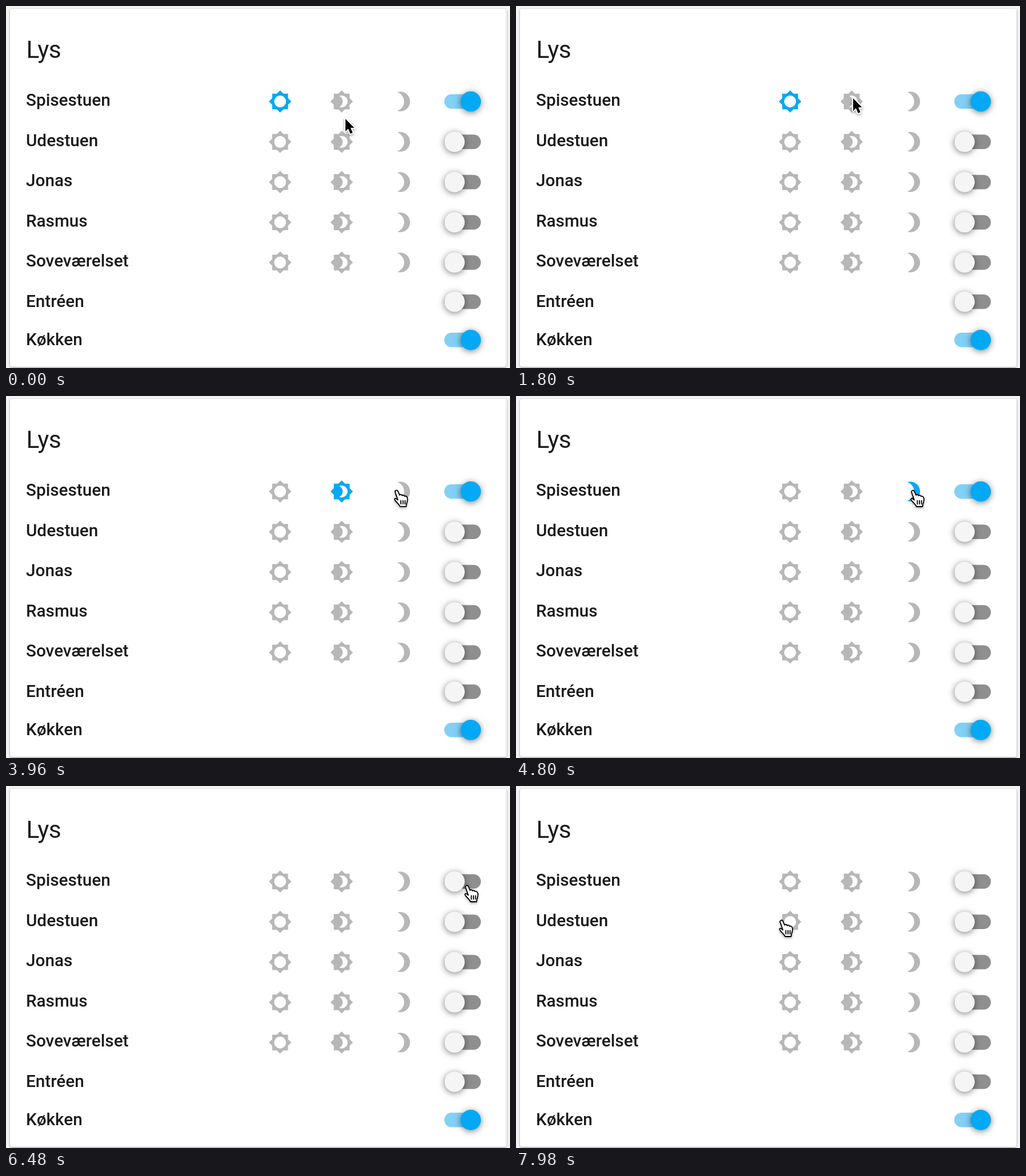
An HTML page for the animation above (8000 ms loop, 882 px wide and 635 px high).

```html
<!DOCTYPE html>
<html lang="da">
<head>
<meta charset="utf-8">
<title>Lys</title>
<style>
  html, body { margin: 0; width: 100%; height: 100%; overflow: hidden; background: #f3f3f3; }
  svg { display: block; width: 882px; height: 635px; }
  text { font-family: Roboto, sans-serif; fill: #1b1b1b; }
  .title { font-size: 42.5px; letter-spacing: -.5px; }
  .label { font-size: 29.7px; font-weight: 500; }
  .card { fill: #fff; filter: drop-shadow(0 1px 1.5px rgba(0,0,0,.4)); }
  .knob { filter: drop-shadow(0 2px 6px rgba(0,0,0,.5)); }
  #cursor { filter: drop-shadow(0 2px 2px rgba(0,0,0,.35)); }
</style>
</head>
<body>
<svg id="stage" viewBox="0 0 882 635">
  <rect class="card" x="7" y="5" width="869" height="628" rx="3.5"/>
  <text class="title" x="35.5" y="90.5">Lys</text>
  <g id="rows"></g>
  <circle id="ripple" cy="167.5" fill="#03a9f4"/>
  <g id="cursor">
    <path id="arrow" stroke="#fff" stroke-width="4" paint-order="stroke" stroke-linejoin="round"
      d="M1 2V24L6 19.3 9.6 28 13.6 26.3 10 17.8H16.5Z"/>
    <g id="hand" fill="#fff" stroke="#000" stroke-width="1.8" stroke-linejoin="round" stroke-linecap="round">
      <path d="M-2.7 3C-3.5 0 .3-2 2 1L5 8C5.5 6.5 9 6.5 9.6 9 10.5 7.5 13 8 13.7 10 15 9 18 10 18.6 13 19.5 17 18.5 20 17 24L16.5 28H6C4 24 0 21-3 17-5 14-2.5 12.5 0 15L2 16.5Z"/>
      <path d="M7.3 17.5V23.5M11 17.5V23.5M14.6 17.5V23.5"/>
    </g>
  </g>
</svg>
<script>
const LOOP = 8000, STEP = 60;
const BLUE = [3, 169, 244], GREY = [183, 183, 183];
const TRACK_ON = [131, 208, 246], TRACK_OFF = [143, 143, 143], KNOB_OFF = [245, 245, 245];

const SUN = 'M20 15.31L23.31 12 20 8.69V4H15.31L12 .69 8.69 4H4V8.69L.69 12 4 15.31V20H8.69L12 23.31 15.31 20H20Z';
const ICONS = [
  { x: 479.7, d: SUN + 'M12 18A6 6 0 0 1 12 6 6 6 0 0 1 12 18Z' },
  { x: 587.5, d: SUN + 'M12 18C11.11 18 10.26 17.8 9.5 17.45 11.56 16.5 13 14.42 13 12 13 9.58 11.56 7.5 9.5 6.55 10.26 6.2 11.11 6 12 6A6 6 0 0 1 12 18Z' },
  { x: 695, d: 'M9 2C7.95 2 6.95 2.16 6 2.46 10.06 3.73 13 7.5 13 12 13 16.5 10.06 20.27 6 21.54 6.95 21.84 7.95 22 9 22A10 10 0 0 0 9 2Z' }
];
const ROOMS = [
  ['Spisestuen', 167.5, true], ['Udestuen', 238.3, true], ['Jonas', 308.9, true],
  ['Rasmus', 379.5, true], ['Soveværelset', 450, true], ['Entréen', 518.7], ['Køkken', 585.8]
];
const LABEL_Y = [175, 245.6, 316.2, 386.8, 457.2, 528, 594.7];

// Pointer stops: time, x, y
const PATH = [
  [0, 593, 196], [1300, 593, 196], [1800, 589, 160], [2100, 587, 165], [3400, 587, 165],
  [4100, 695, 166], [4850, 695, 166], [5500, 809, 178], [5900, 809, 178],
  [6300, 807, 175], [6800, 807, 175], [7750, 465, 236], [LOOP, 465, 236]
];
const DIM_AT = 2520, NIGHT_AT = 4560, TOGGLE_AT = 5760, OFF_AT = 6000;

const $ = id => document.getElementById(id);
const clamp = v => Math.max(0, Math.min(1, v));
const mix = (a, b, k) => a + (b - a) * k;
const rgb = (a, b, k) => `rgb(${a.map((v, i) => Math.round(mix(v, b[i], k)))})`;

function add(tag, attrs, parent) {
  const el = document.createElementNS('http://www.w3.org/2000/svg', tag);
  for (const key in attrs) el.setAttribute(key, attrs[key]);
  return parent.appendChild(el);
}

const rows = ROOMS.map(([name, y, dimmable], i) => {
  const parent = $('rows');
  add('text', { class: 'label', x: 35, y: LABEL_Y[i] }, parent).textContent = name;
  const icons = dimmable ? ICONS.map(icon => add('path', {
    d: icon.d, 'fill-rule': 'evenodd', fill: rgb(GREY, GREY, 0),
    transform: `translate(${icon.x} ${y}) scale(1.73) translate(-12 -12)`
  }, parent)) : [];
  const track = add('rect', { x: 767, y: y - 12.7, width: 64, height: 25.4, rx: 12.7 }, parent);
  const knob = add('circle', { class: 'knob', cy: y, r: 17.8 }, parent);
  return { icons, track, knob };
});

function setToggle({ track, knob }, on) {
  track.setAttribute('fill', rgb(TRACK_OFF, TRACK_ON, on));
  knob.setAttribute('fill', rgb(KNOB_OFF, BLUE, on));
  knob.setAttribute('cx', mix(785, 813.3, on));
}
rows.forEach((row, i) => setToggle(row, i === 6 ? 1 : 0));

function pointerAt(t) {
  const i = PATH.findIndex(stop => stop[0] > t);
  const [t0, x0, y0] = PATH[i - 1], [t1, x1, y1] = PATH[i];
  const k = (t - t0) / (t1 - t0), ease = k * k * (3 - 2 * k);
  return [mix(x0, x1, ease), mix(y0, y1, ease)];
}

function isClickable(x, y) {
  const onIcon = ICONS.some(icon => Math.abs(x - icon.x) < 30);
  const onToggle = x > 767 && x < 831;
  return (onIcon || onToggle) && ROOMS.some(room => Math.abs(y - room[1]) < 26);
}

function draw(t) {
  const active = t < DIM_AT ? 0 : t < NIGHT_AT ? 1 : t < OFF_AT ? 2 : -1;
  rows[0].icons.forEach((icon, i) => icon.setAttribute('fill', rgb(GREY, BLUE, i === active ? 1 : 0)));

  const on = 1 - clamp((t - TOGGLE_AT) / 90);
  setToggle(rows[0], on);

  const age = t - TOGGLE_AT + STEP;
  $('ripple').setAttribute('cx', mix(785, 813.3, on));
  $('ripple').setAttribute('r', 50 * clamp(age / 180));
  $('ripple').setAttribute('opacity', age > 0 ? .2 * clamp((480 - age) / 360) : 0);

  const [x, y] = pointerAt(t);
  const hand = t > 1830 && isClickable(x, y);
  $('cursor').setAttribute('transform', `translate(${x} ${y})`);
  $('hand').setAttribute('visibility', hand ? 'visible' : 'hidden');
  $('arrow').setAttribute('visibility', hand ? 'hidden' : 'visible');
}

const start = performance.now();
function tick() {
  const t = (performance.now() - start) % LOOP;
  draw(Math.floor(t / STEP) * STEP);
  requestAnimationFrame(tick);
}
tick();
</script>
</body>
</html>
```
